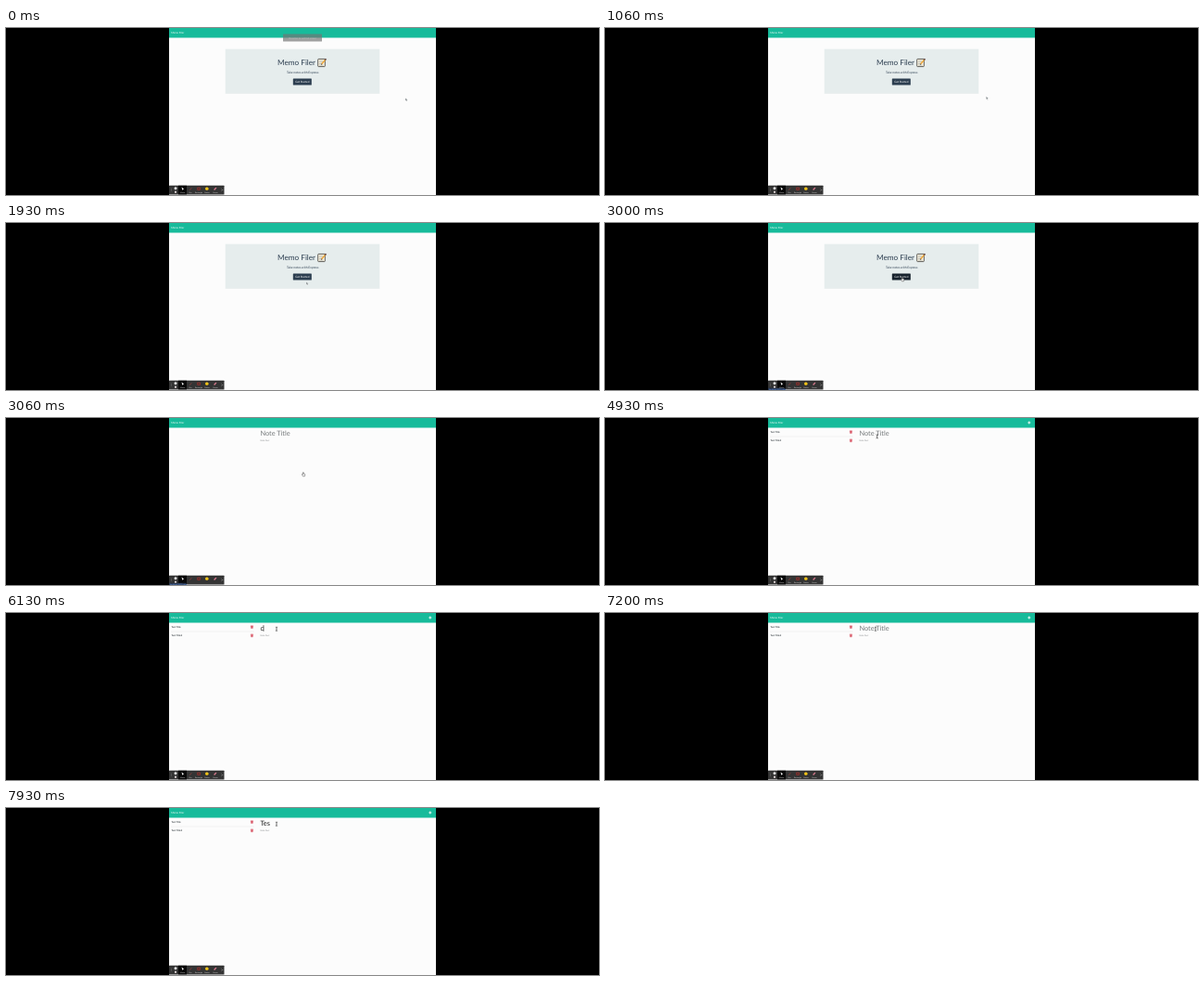
Write an HTML page that moves like this. It is 640x180 px and loops after 8 s.

```html
<!DOCTYPE html>
<html lang="en">
<head>
<meta charset="utf-8">
<title>Note app demo</title>
<style>
html, body { margin: 0; width: 100%; height: 100%; overflow: hidden; background: #000; }
svg { display: block; width: 640px; height: 180px; }
text { font-family: Lato, sans-serif; text-rendering: geometricPrecision; white-space: pre; }
.mid { text-anchor: middle; }
</style>
</head>
<body>
<svg viewBox="0 0 640 180">
  <rect width="640" height="180"/>
  <rect x="176" width="288" height="180" fill="#fcfcfc"/>
  <rect x="176" width="288" height="10.5" fill="#17bb9b"/>
  <text x="178.2" y="6.2" font-size="2.8" fill="#fff">Memo Filer</text>

  <g id="home">
    <rect x="236.7" y="22.6" width="166.6" height="48.2" fill="#e6eded"/>
    <text x="293" y="40.2" font-size="8.2" fill="#2c3e50">Memo Filer</text>
    <g id="memo">
      <rect x="336.7" y="33.4" width="7.6" height="8.2" rx=".7" fill="#fbf3df" stroke="#3b3a38" stroke-width=".8"/>
      <path d="M338 35.4h4M338 37h3.4M338 38.6h2.6M338 40.1h4.6" stroke="#8d9498" stroke-width=".5"/>
      <path d="M340.7 38.7L344.8 33.9" stroke="#e8a33a" stroke-width="1.5"/>
      <path d="M344.3 34.5L345.4 33.2" stroke="#5b3d3a" stroke-width="1.6"/>
      <path d="M340 39.7l.2-1.5 1.1 1z" fill="#333"/>
    </g>
    <text class="mid" x="320.2" y="48.8" font-size="3.3" fill="#2c3e50">Take notes with Express</text>
    <rect id="button" x="309.8" y="54.4" width="20" height="7.2" rx=".5" fill="#2c3e50"/>
    <text class="mid" x="319.8" y="59" font-size="3" fill="#fff">Get Started</text>
  </g>

  <g id="notes">
    <text id="title" x="274.4" y="19" font-size="7.4"></text>
    <rect id="caret" y="13.2" width=".7" height="6.6" fill="#222"/>
    <text x="274.5" y="24.8" font-size="2.3" fill="#85898b">Note Text</text>
    <g id="list">
      <g font-size="2.5" font-weight="700" fill="#3c4348">
        <text x="178.6" y="16.1">Test Title</text>
        <text x="178.6" y="25.3">Test Title2</text>
      </g>
      <path d="M178 20H268" stroke="#e4e6e6" stroke-width=".5"/>
      <g id="bins"></g>
      <path d="M456.3 5h3M457.8 3.5v3" stroke="#fff" stroke-width=".9"/>
    </g>
  </g>

  <g id="toast">
    <rect x="299" y="6.6" width="42" height="8" rx=".4" fill="#747474" fill-opacity=".68"/>
    <text class="mid" x="320" y="11.6" font-size="2.5" fill="#b9c7c4">Press Esc to exit full screen</text>
  </g>

  <g id="toolbar">
    <rect x="176" y="169.8" width="59.5" height="9.6" rx=".5" fill="#343434"/>
    <rect x="186" y="169.8" width="9" height="9.6" fill="#080808"/>
    <path d="M178.4 172.8v3.4" stroke="#777" stroke-width=".5"/>
    <circle cx="183" cy="172.7" r="1.5" fill="#e6e6e6"/>
    <rect x="182" y="175.8" width="2" height="2" fill="#d8cfcf"/>
    <path d="M189.6 171.6l2.6 2.3-1.3.1-.6 1.1z" fill="#fff"/>
    <path d="M198.2 174.7l2-2.2" stroke="#a8423d" stroke-width=".7"/>
    <rect x="206.8" y="172.2" width="2.5" height="2.3" fill="none" stroke="#b62c27" stroke-width=".7"/>
    <circle cx="216.8" cy="173.3" r="1.8" fill="#ecc018"/>
    <path d="M224.6 174.5l2.3-2.4" stroke="#dd7d91" stroke-width="1.3"/>
    <path d="M232.7 173.6l1 1-1 1" fill="none" stroke="#ddd" stroke-width=".5"/>
    <g id="labels" class="mid" font-size="1.9" fill="#d5d5d5"></g>
  </g>
  <g id="status">
    <rect x="176" y="177.8" width="18.5" height="2.2" fill="#26344d"/>
    <text x="177" y="179.5" font-size="2" fill="#77a9ff">localhost:3001/notes</text>
  </g>

  <g id="cursor">
    <path id="arrow" d="M0 0v3.1l.8-.7.6 1.2.6-.3-.5-1.1 1-.1z" transform="translate(-1 -1.5)" fill="#777f82" stroke="#fff" stroke-width=".3"/>
    <path id="hand" d="M-.6-2v2.1l-.8-.4-.3.5 1.2 1.9H1.4L1.8.2 1.5-.4.3-.6V-2z" fill="#fff" stroke="#333" stroke-width=".45"/>
    <path id="beam" d="M-1.1-2h.7l.4.4.4-.4h.7M0-1.6v3.2M-1.1 2h.7l.4-.4.4.4h.7" fill="none" stroke="#222" stroke-width=".65"/>
  </g>
</svg>
<script>
const LOOP = 8000;
const $ = id => document.getElementById(id);
const show = (id, on) => $(id).style.display = on ? "" : "none";

// time, x, y
const path = [
  [0, 432, 77], [930, 432, 77], [1330, 372, 72], [1730, 326, 66], [1930, 325, 65],
  [2460, 321, 60.5], [3800, 321, 61], [4260, 308, 39], [4600, 296.5, 24],
  [4660, 296, 23.5], [5130, 292, 17.2], [LOOP, 292, 17.2]
];
// time, typed text
const typing = [[0, ""], [6130, "c"], [6860, ""], [7530, "T"], [7800, "Te"], [7930, "Tes"]];

$("labels").innerHTML = [["Mouse", 190.5], ["Pen", 199], ["Rectangle", 208], ["Sticker", 217], ["Eraser", 226]]
  .map(([name, x]) => `<text x="${x}" y="177.5">${name}</text>`).join("");
$("bins").innerHTML = [15, 24.2].map(y =>
  `<path d="M264.2 ${y - 1}h2.4l-.3 2.6h-1.8zM263.9 ${y - 1.3}h3" fill="#d95c6b" stroke="#d95c6b" stroke-width=".4"/>`).join("");

function pointAt(t) {
  const i = path.findIndex(p => p[0] > t);
  const [t0, x0, y0] = path[i - 1], [t1, x1, y1] = path[i];
  const k = (t - t0) / (t1 - t0);
  return [x0 + (x1 - x0) * k, y0 + (y1 - y0) * k];
}

function draw(t) {
  const onNotes = t >= 3060;
  show("home", !onNotes);
  show("notes", onNotes);
  show("list", t >= 3200);
  show("labels", t < 3060 || t >= 3260);
  show("status", t >= 2260 && t < 3330);
  $("button").setAttribute("fill", t >= 2860 ? "#17222d" : t >= 2330 ? "#1f2d3a" : "#2c3e50");
  $("toast").style.opacity = Math.max(0, 1 - Math.max(0, t - 30) / 430);

  const typed = typing.filter(s => s[0] <= t).pop()[1];
  $("title").textContent = typed || "Note Title";
  $("title").setAttribute("fill", typed ? "#1b1b1b" : "#777b7d");
  show("caret", t >= 6130 && t < 6660 || t >= 6860 && t < 7200);
  $("caret").setAttribute("x", typed ? 277.6 : 274.2);

  const [x, y] = pointAt(t);
  $("cursor").setAttribute("transform", `translate(${x} ${y})`);
  show("arrow", t < 2330);
  show("hand", t >= 2330 && t < 3400);
  show("beam", t >= 3400);
}

function tick() {
  draw(performance.now() % LOOP);
  requestAnimationFrame(tick);
}
tick();
</script>
</body>
</html>
```
